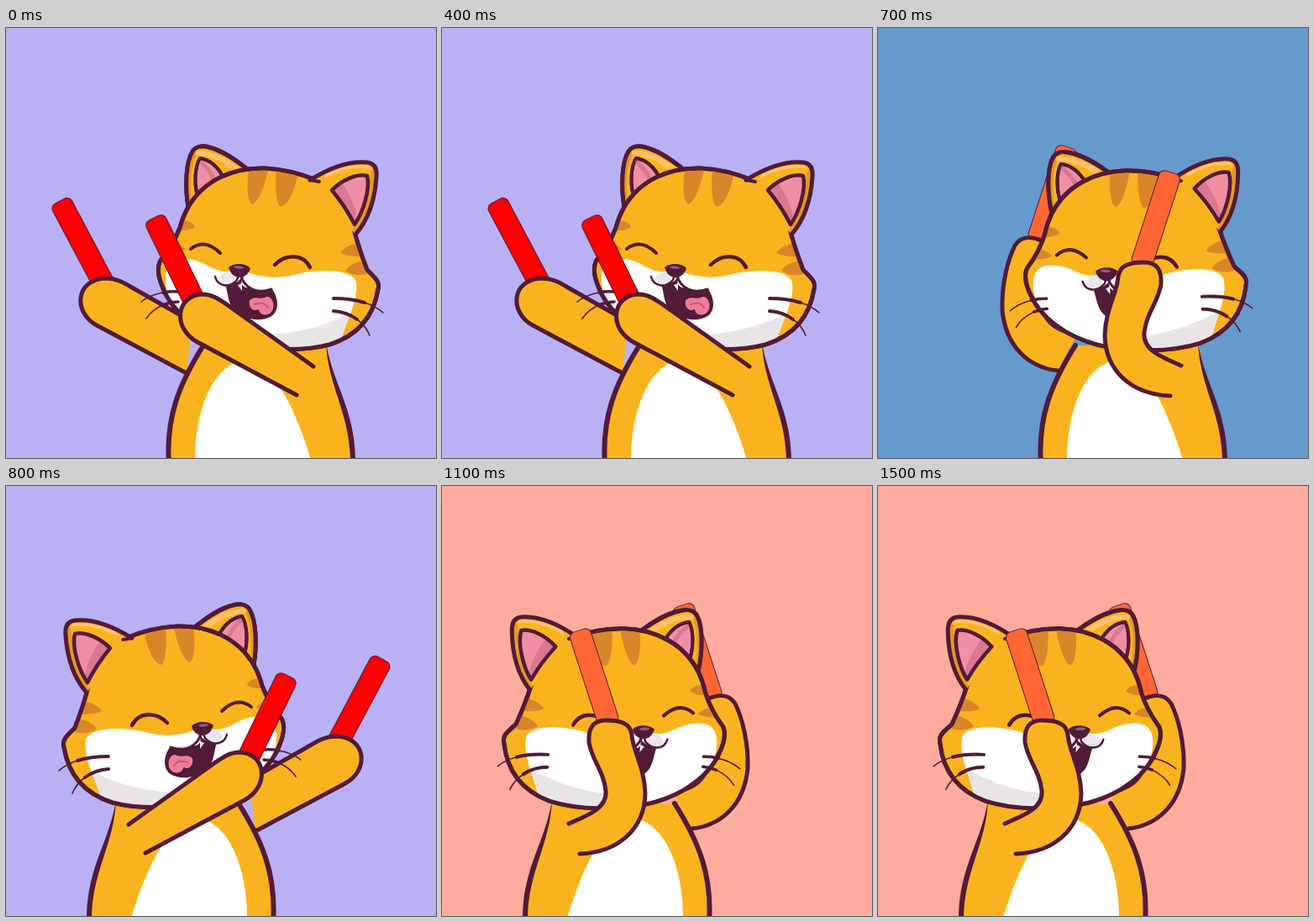
Animation, 512 px wide and 512 px high, one loop 1600 ms. Source, as an HTML page with a canvas:

```html
<!DOCTYPE html>
<html lang="en">
<head>
<meta charset="utf-8">
<title>Cheering cat</title>
<style>
  html, body { margin: 0; width: 100%; height: 100%; overflow: hidden; }
  canvas { display: block; width: 512px; height: 512px; }
</style>
</head>
<body>
<canvas id="stage" width="512" height="512"></canvas>
<script>
const ctx = document.getElementById('stage').getContext('2d');

const INK = '#521b37', FUR = '#f9b31e', STRIPE = '#d9852a', PINK = '#f08fa3';
const SHADE = '#e6971f', ROSE = '#d9788f', LIGHT = '#ffc16b';
const STEP = 100, STEPS = 16;
const BACKDROPS = ['#b9b1f4', '#f07372', '#a3dfa6', '#6699cc', '#b9b1f4', '#ffeb84', '#a3dfa6', '#ffab9d'];
const STICKS = ['#ff0000', '#15c5ef', '#ffff33', '#ff6633'];

const shapes = {
  body: 'M235 378C206 424 190 464 194 520L413 520C415 458 389 425 382 376Z',
  belly: 'M225 514C225 455 246 405 278 397C322 394 348 466 363 514Z',
  leftEar: 'M217 213C213 190 214 160 222 147C226 140 235 140 242 142C258 146 272 156 286 167L260 200Z',
  leftEarInner: 'M230 206C222 185 226 163 231 155C244 157 254 168 260 180Z',
  leftEarLight: 'M226 147C240 144 263 154 277 166L268 168C257 158 242 152 226 151Z',
  rightEar: 'M362 181C386 166 410 158 430 160C439 161 442 168 441 178C439 206 430 230 416 246',
  rightEarInner: 'M388 193C400 181 418 173 430 176C434 192 425 220 415 234C408 220 398 205 388 193Z',
  rightEarLight: 'M380 174C396 165 418 162 433 164L434 168C416 165 397 169 380 179Z',
  head: 'M217 213C236 181 270 166 308 167C335 168 355 175 372 182C395 198 410 222 416 246' +
        'C420 262 427 280 430 288C438 296 446 302 443 311C438 342 420 366 385 377' +
        'C350 386 300 384 262 372C225 360 195 335 185 305C180 292 180 280 186 274' +
        'C196 262 203 248 207 238C209 230 212 222 217 213Z',
  muzzle: 'M194 282C202 270 225 274 242 284C255 291 265 292 278 286C300 299 328 299 350 292' +
          'C383 286 412 289 417 302C420 328 405 345 395 385L240 390C212 365 178 310 194 282Z',
  chin: 'M290 366C335 366 383 357 416 335L410 390L280 390Z',
  stripes: 'M289 171C286 190 288 206 293 210C301 207 308 188 312 169Z' +
           'M322 170C320 190 322 210 327 213C336 212 344 192 347 176Z' +
           'M420 256C408 258 401 263 398 268C406 272 417 272 426 272Z' +
           'M426 277C414 279 407 284 404 289C412 295 422 295 430 293Z' +
           'M211 229C218 229 224 233 225 237C220 241 213 241 206 241Z' +
           'M199 255C206 256 212 260 214 264C207 267 199 267 192 267Z',
  mouth: 'M263 307C274 307 279 302 282 298C287 314 302 317 316 312C323 323 324 336 315 342' +
         'C301 350 279 344 271 333C265 325 266 315 263 307Z',
  tongue: 'M289 324C296 316 303 324 310 319C317 318 322 328 318 337C313 345 302 344 300 336C295 339 287 334 289 324Z'
};
const paths = Object.fromEntries(Object.entries(shapes).map(([k, d]) => [k, new Path2D(d)]));

// Each stick is [top x, top y, tilt in degrees].
const poses = [
  {
    headTurn: 0,
    backStick: [64, 206, -28], frontStick: [176, 226, -26],
    backArm: new Path2D('M215 411L108 354C79 338 83 299 119 298C131 298 140 303 150 309L222 350'),
    frontArm: new Path2D('M346 437L228 374C197 357 203 318 234 317C246 317 255 324 264 330L366 403')
  },
  {
    headTurn: -0.056,
    backStick: [226, 142, 18], frontStick: [349, 172, 18],
    backArm: new Path2D('M214 408C179 404 152 379 148 336C147 304 155 275 163 259C170 248 181 247 197 254L245 350'),
    frontArm: new Path2D('M348 438C301 436 271 408 270 366C271 334 285 315 286 296C288 282 300 279 317 279' +
      'C332 279 338 288 337 305C334 326 319 340 317 363C315 383 337 392 361 402')
  }
];

function fill(path, color) {
  ctx.fillStyle = color;
  ctx.fill(path);
}

function line(path, width = 5, color = INK) {
  ctx.lineWidth = width;
  ctx.strokeStyle = color;
  ctx.stroke(typeof path === 'string' ? new Path2D(path) : path);
}

function outlined(path, color, width = 5) {
  fill(path, color);
  line(path, width);
}

function clipped(path, draw) {
  ctx.save();
  ctx.clip(path);
  draw();
  ctx.restore();
}

function oval(x, y, rx, ry, turn, color) {
  ctx.beginPath();
  ctx.ellipse(x, y, rx, ry, turn, 0, Math.PI * 2);
  ctx.fillStyle = color;
  ctx.fill();
}

function drawStick([x, y, degrees], color) {
  ctx.save();
  ctx.translate(x, y);
  ctx.rotate(degrees * Math.PI / 180);
  const stick = new Path2D();
  stick.roundRect(-13, 0, 26, 118, 7);
  outlined(stick, color, 1);
  ctx.restore();
}

function drawEars() {
  outlined(paths.leftEar, FUR);
  clipped(paths.leftEar, () => {
    line('M219 213C215 190 217 163 224 149', 6, SHADE);
    fill(paths.leftEarLight, LIGHT);
  });
  line(paths.leftEar);
  outlined(paths.leftEarInner, PINK, 4);
  clipped(paths.leftEarInner, () => line('M229 157C245 170 248 180 252 196', 5, ROSE));
  line(paths.leftEarInner, 4);
}

function drawRightEar() {
  fill(paths.rightEar, FUR);
  clipped(paths.rightEar, () => {
    line('M438 172C435 205 426 228 416 243', 7, SHADE);
    fill(paths.rightEarLight, LIGHT);
  });
  line(paths.rightEar);
  line('M362 181L373 183', 4);
  fill(paths.rightEarInner, PINK);
  clipped(paths.rightEarInner, () => oval(397, 200, 11, 38, -0.5, ROSE));
  line(paths.rightEarInner, 4.5);
}

function drawFace() {
  clipped(paths.head, () => {
    fill(paths.stripes, STRIPE);
    fill(paths.muzzle, '#ffffff');
    clipped(paths.muzzle, () => fill(paths.chin, '#e9e4e5'));
  });
  line(paths.head);
  drawRightEar();

  line('M220 263Q237 250 255 268', 4);
  line('M320 282C334 268 354 269 362 285', 4.5);

  outlined(paths.mouth, INK, 3);
  outlined(paths.tongue, '#ed7d97', 2);
  line('M296 329Q308 325 312 333', 2, '#c95876');
  oval(263, 299, 10, 8, -0.4, '#e9e7ed');
  oval(287, 303, 7, 6, 0.6, '#ffffff');
  line('M249 296C252 308 266 310 275 300L278 292', 2.5);
  line('M279 294C285 311 299 317 316 311', 3);
  fill(new Path2D('M276 306L281 304L281 313Z'), '#ffffff');
  fill(new Path2D('M265 285C271 279 286 280 291 286C289 294 283 297 277 297C270 296 267 291 265 285Z'), INK);
  oval(277, 285, 6, 1.7, 0.1, '#8b6075');

  line('M390 322Q411 322 427 327', 4);
  line('M427 327Q440 331 449 339', 1.6);
  line('M390 337Q406 338 418 347', 4);
  line('M418 347Q428 354 433 366', 1.6);
  line('M205 314Q196 313 187 315', 3.5);
  line('M187 315Q171 318 161 326', 1.6);
  line('M205 326Q197 326 189 329', 3.5);
  line('M189 329Q174 335 167 346', 1.6);
}

function drawHead(turn) {
  ctx.save();
  ctx.translate(350, 395);
  ctx.rotate(turn);
  ctx.translate(-350, -395);
  drawEars();
  outlined(paths.head, FUR);
  drawFace();
  ctx.restore();
}

function drawBody() {
  fill(paths.body, FUR);
  fill(paths.belly, '#ffffff');
  line('M235 378C206 424 190 464 194 520', 6);
  fill(new Path2D('M381 374C389 425 417 455 416 520L410 520C411 460 383 428 381 374Z'), INK);
}

function render() {
  const frame = Math.floor(performance.now() / STEP) % STEPS;
  const mirrored = frame >= STEPS / 2;
  const pose = poses[frame % 2];
  const backdrop = BACKDROPS[frame % 4 + (mirrored ? 4 : 0)];
  const stickColor = STICKS[frame % 4];

  ctx.setTransform(1, 0, 0, 1, 0, 0);
  ctx.fillStyle = backdrop;
  ctx.fillRect(0, 0, 512, 512);
  if (mirrored) ctx.setTransform(-1, 0, 0, 1, 512, 0);
  ctx.lineCap = ctx.lineJoin = 'round';

  drawStick(pose.backStick, stickColor);
  outlined(pose.backArm, FUR);
  drawBody();
  if (frame % 2) outlined(new Path2D('M196 338Q202 355 222 362L218 345Z'), backdrop, 3);
  drawHead(pose.headTurn);
  drawStick(pose.frontStick, stickColor);
  outlined(pose.frontArm, FUR);

  requestAnimationFrame(render);
}
render();
</script>
</body>
</html>
```
